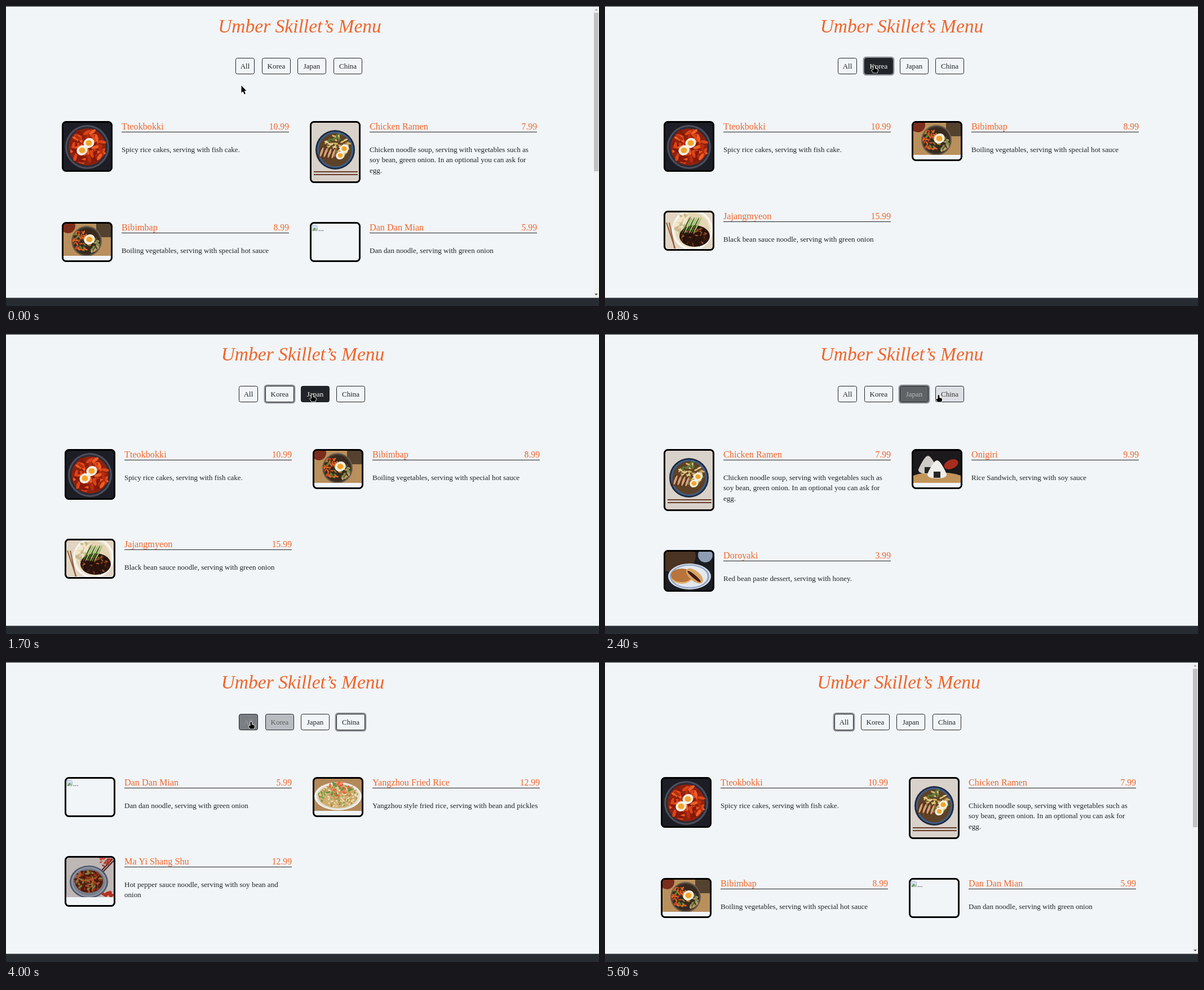
An HTML page with a canvas for the animation above (5700 ms loop, 1052 by 532 pixels).

```html
<!DOCTYPE html>
<html lang="en">
<head>
<meta charset="utf-8">
<title>Menu</title>
<style>
html, body { margin: 0; width: 100%; height: 100%; overflow: hidden; background: #f1f5f8; }
canvas { display: block; }
</style>
</head>
<body>
<canvas id="stage" width="1052" height="532"></canvas>
<script>
const g = document.getElementById('stage').getContext('2d');
const LOOP = 5700, STEP = 100, FADE = 150;
const PAPER = '#f1f5f8', INK = '#212529', BAR = '#272c33', ORANGE = '#f0652b';
const SERIF = '"Liberation Serif", "Times New Roman", serif';
const PHOTO = 84, LINE = 18.7;

// --- drawing helpers
function text(str, x, y, size, color, align = 'left', style = '') {
  g.font = `${style} ${size}px ${SERIF}`;
  g.textAlign = align;
  g.fillStyle = color;
  g.fillText(str, x, y);
}
function box(x, y, w, h, color) {
  g.fillStyle = color;
  g.fillRect(x, y, w, h);
}
function oval(x, y, rx, ry, color, turn = 0) {
  g.beginPath();
  g.ellipse(x, y, rx, ry, turn, 0, 7);
  g.fillStyle = color;
  g.fill();
}
function shape(d, color) {
  g.fillStyle = color;
  g.fill(new Path2D(d));
}
function frame(x, y, w, h, r, width, color) {
  g.beginPath();
  g.roundRect(x, y, w, h, r);
  g.lineWidth = width;
  g.strokeStyle = color;
  g.stroke();
}
function pointerIcon(path, x, y) {
  g.save();
  g.translate(x, y);
  g.lineWidth = 1.6;
  g.strokeStyle = '#fff';
  g.stroke(path);
  g.fillStyle = '#000';
  g.fill(path);
  g.restore();
}

// --- food helpers
const back = color => box(0, 0, PHOTO, 120, color);
function plate(x, y, rx, ry, rim, edge, food) {
  [rim, edge, food].forEach((c, i) => oval(x, y, rx * (1 - i * .08), ry * (1 - i * .08), c));
}
// Seeded scraps spread evenly over an ellipse
function bits(count, x, y, rx, ry, size, ...colors) {
  let seed = count * 77 + 5;
  const rnd = () => (seed = seed * 16807 % 2147483647) / 2147483647;
  rnd();
  for (let i = 0; i < count; i++) {
    const a = rnd() * 6.28, d = Math.sqrt(rnd());
    oval(x + rx * d * Math.cos(a), y + ry * d * Math.sin(a), size, size * .4, colors[i % colors.length], rnd() * 3.14);
  }
}
function egg(x, y, r) {
  oval(x, y, r, r * .85, '#f4eee2', -.5);
  oval(x, y, r * .55, r * .5, '#f2a428');
}
function sticks(x, y, dx, dy, color) {
  g.lineWidth = 2;
  g.strokeStyle = color;
  for (const k of [0, 5]) {
    g.beginPath();
    g.moveTo(x + (dy ? k : 0), y + (dy ? 0 : k));
    g.lineTo(x + dx, y + dy + k);
    g.stroke();
  }
}

// --- dish pictures
const art = {
  riceCake() {
    back('#1c1d25');
    plate(42, 43, 39, 39, '#4b4e5c', '#2f2a33', '#8f220d');
    bits(70, 42, 43, 29, 29, 7, '#dc4518', '#b92d0e', '#ee5f26', '#86190a');
    egg(45, 36, 10);
    egg(33, 49, 10);
  },
  ramen() {
    back('#d8d2ca');
    plate(42, 48, 35, 35, '#1f2a3d', '#3f5f8c', '#5e4227');
    bits(60, 46, 40, 22, 20, 4, '#d5b469', '#8b6a38', '#5f7c36', '#e4cd8a');
    for (let i = 0; i < 4; i++) {
      oval(17 + i * 7, 52 + i, 3.4, 11, '#5d3019', .35);
      oval(18 + i * 7, 52 + i, 2, 9, '#d0a47c', .35);
    }
    egg(58, 46, 8.5);
    egg(51, 58, 8);
    sticks(4, 87, 78, 0, '#693c2b');
  },
  bibimbap() {
    back('#b9905c');
    oval(8, 4, 13, 13, '#7c2c1b');
    box(58, 0, 26, 24, '#54422f');
    plate(41, 31, 27, 27, '#6b5d4e', '#40342a', '#37291d');
    bits(50, 32, 30, 16, 18, 3.5, '#e06a28', '#c9481c', '#6b7e34');
    bits(25, 55, 38, 8, 13, 4, '#c0a26d', '#54422a', '#7e8d48');
    egg(46, 28, 10);
  },
  blackBean() {
    back('#e2d5c3');
    sticks(2, 18, 16, 48, '#935d3b');
    plate(48, 31, 36, 36, '#fbf8f2', '#f0e8d6', '#e4d6b5');
    bits(45, 34, 22, 17, 16, 6, '#f2e7ca', '#cbb88e');
    oval(52, 42, 27, 19, '#2a140d');
    bits(45, 52, 42, 25, 17, 3, '#7b3b1e', '#1f0d09', '#9a572c', '#3b1b10');
    for (let i = 0; i < 6; i++) oval(37 + i * 4, 23, 16, 1.3, i % 2 ? '#9fbd68' : '#44702c', -1.1);
  },
  onigiri() {
    back('#1b191b');
    oval(42, 58, 58, 20, '#c3955a');
    oval(67, 24, 13, 8, '#a92d1d', -.4);
    for (const [x, y, c] of [[26, 26, '#cfcbc7'], [42, 34, '#f0eeeb']]) {
      shape(`M${x} ${y - 17}Q${x + 6} ${y - 17} ${x + 17} ${y + 7}Q${x + 18} ${y + 15} ${x} ${y + 15}Q${x - 18} ${y + 15} ${x - 17} ${y + 7}Q${x - 6} ${y - 17} ${x} ${y - 17}`, c);
      box(x - 6, y + 3, 12, 11, '#262722');
    }
  },
  doroyaki() {
    back('#1b1d22');
    oval(14, 8, 40, 28, '#4b3323');
    oval(71, 6, 13, 13, '#8e9db3');
    plate(43, 44, 38, 23, '#d5dce6', '#8ea2c4', '#e3e8f0');
    oval(29, 45, 19, 12, '#e0b679');
    oval(29, 42, 19, 12, '#b8743a');
    oval(52, 43, 18, 9, '#d9a565', .7);
    oval(51, 44, 15, 3, '#3e1c15', .7);
  },
  friedRice() {
    back('#b3895a');
    plate(42, 31, 42, 25, '#f0eee8', '#e2dfd6', '#cfae72');
    bits(170, 42, 29, 35, 20, 2.6, '#ead6a5', '#c69a56', '#f0e3bd', '#b98c4b', '#6f9b3e');
    bits(28, 42, 18, 22, 12, 4, '#e4603a', '#f08660', '#5d9440');
  },
  hotNoodle() {
    back('#bdb7b6');
    sticks(82, 2, -30, 32, '#4d1f1c');
    bits(18, 69, 6, 11, 9, 3, '#a52d1d', '#cf4630');
    plate(40, 43, 34, 29, '#4f5668', '#9096a4', '#777d8b');
    oval(40, 42, 25, 20, '#541f10');
    bits(100, 40, 41, 24, 19, 4, '#8c3417', '#b4512a', '#4d190d', '#7d8243');
    bits(6, 74, 64, 8, 4, 6, '#b3321f');
  },
  missing() {
    shape('M1 2H8L11 5V13H1Z', '#b5b9bf');
    shape('M2 3H8L10 5V8L2 12Z', '#d3e0f5');
    shape('M2 12L5 7L8 9L3 13Z', '#55a83f');
    text('...', 12, 13, 13, INK);
  }
};

// --- content
const dish = (name, price, about, pic, photoH) => {
  const lines = about.split('\n');
  return { name, price, lines, pic, photoH, h: Math.floor(Math.max(photoH + 6, 71.5 + LINE * (lines.length - 1))) };
};
const tteokbokki = dish('Tteokbokki', '10.99', 'Spicy rice cakes, serving with fish cake.', 'riceCake', 84);
const ramen = dish('Chicken Ramen', '7.99', 'Chicken noodle soup, serving with vegetables such as\nsoy bean, green onion. In an optional you can ask for\negg.', 'ramen', 104);
const bibimbap = dish('Bibimbap', '8.99', 'Boiling vegetables, serving with special hot sauce', 'bibimbap', 57);
const danDan = dish('Dan Dan Mian', '5.99', 'Dan dan noodle, serving with green onion', 'missing', 57);
const jajang = dish('Jajangmyeon', '15.99', 'Black bean sauce noodle, serving with green onion', 'blackBean', 64);
const onigiri = dish('Onigiri', '9.99', 'Rice Sandwich, serving with soy sauce', 'onigiri', 57);
const doroyaki = dish('Doroyaki', '3.99', 'Red bean paste dessert, serving with honey.', 'doroyaki', 68);
const friedRice = dish('Yangzhou Fried Rice', '12.99', 'Yangzhou style fried rice, serving with bean and pickles', 'friedRice', 57);
const maYi = dish('Ma Yi Shang Shu', '12.99', 'Hot pepper sauce noodle, serving with soy bean and\nonion', 'hotNoodle', 70);

const menus = [
  [tteokbokki, ramen, bibimbap, danDan],
  [tteokbokki, bibimbap, jajang],
  [ramen, onigiri, doroyaki],
  [danDan, friedRice, maYi]
];
let edge = 413.4;
const buttons = ['All', 'Korea', 'Japan', 'China'].map((label, i) => {
  const w = i ? 51 : 34.4, x = edge;
  edge += w + 12.3;
  return { label, x, w };
});

// --- motion: each click shows the next menu; pointer legs speed up from rest
const clicks = [800, 1800, 3300, 4700];
const holds = [[2400, 3300], [4000, 4700]];
const legs = [
  { from: 0, to: 400, x: 478, y: 106 },
  { from: 1000, to: 1500, x: 544, y: 107 },
  { from: 2200, to: 2400, x: 592, y: 108 },
  { from: 2400, to: 3100, x: 617, y: 107 },
  { from: 3300, to: 3940, x: 435, y: 106 },
  { from: 4700, to: 5100, x: 316, y: 115 },
  { from: 5300, to: 5600, x: -233, y: -139 }
];
function pointerAt(t) {
  let x = 417.5, y = 141;
  for (const leg of legs) {
    const p = Math.min(1, Math.max(0, (t - leg.from) / (leg.to - leg.from))) ** 2;
    x += (leg.x - x) * p;
    y += (leg.y - y) * p;
  }
  return { x, y };
}
const hits = (b, p, dx) => p.x > b.x + dx && p.x < b.x + dx + b.w && p.y > 92 && p.y < 121;

// Share of the fade time just past that the pointer spent on the button
function hoverFill(b, t, dx) {
  const n = 30;
  let on = 0;
  for (let i = 0; i < n; i++) on += hits(b, pointerAt(t - i * FADE / n), dx);
  return on / n;
}

const HAND = new Path2D('M-1.5 7V1Q0-1 1.2 1V5L5 6Q6.5 6.5 6 9L4.8 12.5H-2L-4.6 8.5L-4 7Z');
const ARROW = new Path2D('M0 0V13L3 10.3L5.2 15.5L7.4 14.5L5.2 9.5H9Z');

function drawDish(d, x, y) {
  g.save();
  g.translate(x + 3, y + 3);
  g.beginPath();
  g.rect(0, 0, PHOTO, d.photoH);
  g.clip();
  art[d.pic]();
  g.restore();
  frame(x + 1.5, y + 1.5, PHOTO + 3, d.h - 3, 6, 3, '#000');
  const left = x + 106, right = x + 403;
  text(d.name, left, y + 15, 16.2, ORANGE);
  text(d.price, right, y + 15, 15.7, ORANGE, 'right');
  box(left, y + 19, right - left, 1, INK);
  d.lines.forEach((s, i) => text(s, left, y + 54.5 + i * LINE, 13.08, INK));
}

function drawButton(b, dx, fill, focused) {
  const x = Math.floor(b.x + dx) + .5, y = 92.5, w = Math.floor(b.w) - 1, h = 28, ring = 2.8;
  const mix = Math.round(35 + 213 * fill);
  if (focused) frame(x - ring / 2, y - ring / 2, w + ring, h + ring, 4, ring, '#8b8f93');
  g.beginPath();
  g.roundRect(x, y, w, h, 3);
  g.fillStyle = `rgba(33, 37, 41, ${fill})`;
  g.fill();
  frame(x, y, w, h, 3, 1, INK);
  text(b.label, x + w / 2, 110.5, 13, `rgb(${mix}, ${mix}, ${mix})`, 'center');
}

function drawScrollbar() {
  box(1042, 1, 10, 516, '#f1f1f1');
  box(1043, 12, 8, 281, '#c1c1c1');
  shape('M1044 8L1047 5L1050 8Z', '#a3a3a3');
  shape('M1044 510L1047 513L1050 510Z', '#505050');
}

function draw(time) {
  const held = holds.find(([a, b]) => time >= a && time < b);
  const t = held ? held[0] : Math.floor(time / STEP) * STEP;
  const count = clicks.filter(c => c <= time).length, menu = count % menus.length;
  const dx = menu ? 0 : -5.5;
  const dishes = menus[menu], top = 204;
  const row2 = top + 69 + Math.max(dishes[0].h, dishes[1].h);

  box(0, 0, 1052, 532, PAPER);
  text('Umber Skillet’s Menu', 526.5 + dx, 47, 33.5, ORANGE, 'center', 'italic');
  buttons.forEach((b, i) => drawButton(b, dx, hoverFill(b, t, dx), count && i === menu));
  dishes.forEach((d, i) => drawDish(d, Math.floor(104.6 + i % 2 * 440 + dx), i < 2 ? top : row2));

  box(0, 0, 1052, 1, BAR);
  box(0, 517.5, 1052, 15, BAR);
  if (!menu) drawScrollbar();

  const p = pointerAt(t);
  pointerIcon(buttons.some(b => hits(b, p, dx)) ? HAND : ARROW, p.x, p.y);
}

const start = performance.now();
function tick() {
  draw((performance.now() - start) % LOOP);
  requestAnimationFrame(tick);
}
tick();
</script>
</body>
</html>
```
